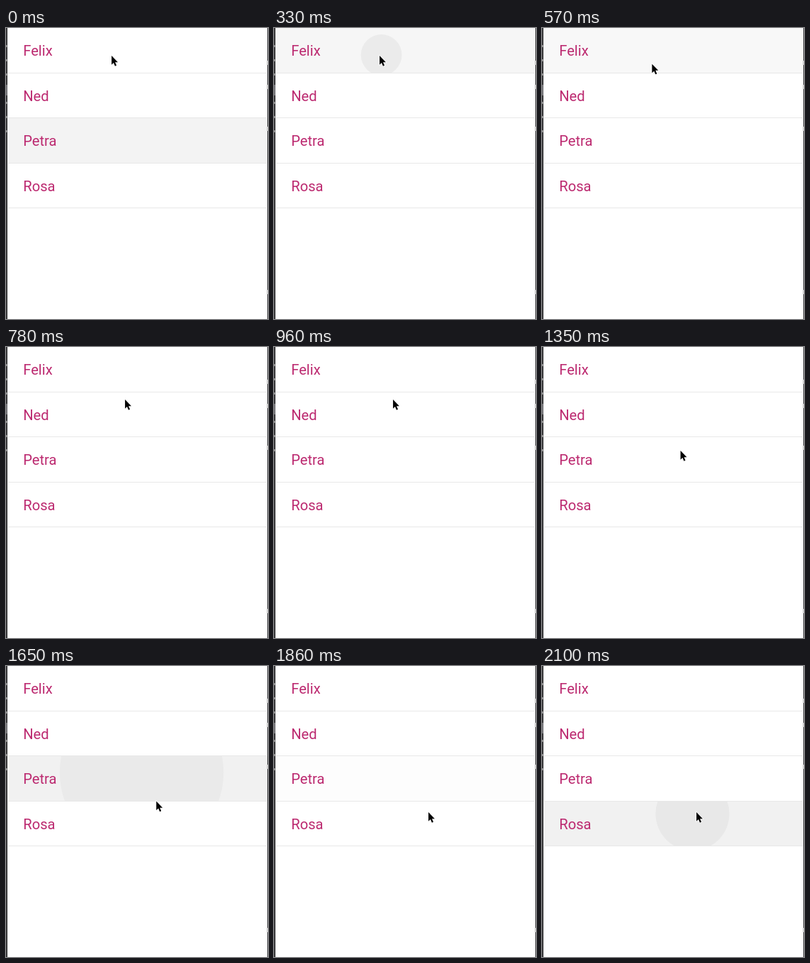
An HTML page that plays this animation: 370x410 px, repeating every 2220 ms.

```html
<!DOCTYPE html>
<html lang="en">
<head>
<meta charset="utf-8">
<title>Ripple list</title>
<style>
  html, body { margin: 0; width: 100%; height: 100%; overflow: hidden; background: #fff; }
  svg { display: block; }
  text { font: 20.2px Roboto, "Liberation Sans", sans-serif; fill: #bc2a70; }
</style>
</head>
<body>
<svg width="370" height="410" viewBox="0 0 370 410">
  <rect width="370" height="410" fill="#fff"/>
  <g id="list"></g>
  <g id="edges"></g>
  <g id="cursor">
    <path id="arrow" d="M0 0V14.6L3.3 11.5L5.6 16.8L8 15.8L5.7 10.6H10.2Z" transform="translate(.6 .6) scale(.87)" stroke="#fff" stroke-width="1.6" paint-order="stroke"/>
  </g>
</svg>
<script>
const LOOP = 2220, STEP = 30, HOLD = 2100, MOVE = 240;
const ROW = 63.5, WIDTH = 370;
const NAMES = ["Felix", "Ned", "Petra", "Rosa"];

// where the pointer rests in each row, and when it sets off to get there
const STOPS = [
  { x: 148.5, y: 38.5, go: -MOVE },
  { x: 167.5, y: 73.5, go: 540 },
  { x: 195, y: 145.5, go: 1042 },
  { x: 217.5, y: 205.5, go: 1563 }
];

// the first press is still fading out as the loop begins
const TAPS = [
  { row: 2, at: -240 },
  { row: 0, at: 300 },
  { row: 1, at: 990 },
  { row: 2, at: 1530 },
  { row: 3, at: 2046 }
];

const clamp = v => Math.max(0, Math.min(1, v));
const mix = (a, b, p) => a + (b - a) * p;
const easeOut = p => 1 - (1 - p) ** 3;
const byId = id => document.getElementById(id);

function setAttrs(el, attrs) {
  for (const key in attrs) el.setAttribute(key, attrs[key]);
}

function add(parent, tag, attrs) {
  const el = parent.appendChild(document.createElementNS("http://www.w3.org/2000/svg", tag));
  setAttrs(el, attrs);
  return el;
}

const list = byId("list"), edges = byId("edges"), cursor = byId("cursor");
const rowBox = i => ({ x: 2, y: i * ROW, width: WIDTH - 3, height: ROW });

NAMES.forEach((name, i) => {
  add(add(list, "clipPath", { id: "row" + i }), "rect", rowBox(i));
});
for (const tap of TAPS) {
  tap.tint = add(list, "rect", rowBox(tap.row));
  tap.ink = add(list, "circle", { "clip-path": `url(#row${tap.row})` });
}
NAMES.forEach((name, i) => {
  add(list, "text", { x: 24.2, y: 39.2 + i * ROW }).textContent = name;
  add(list, "rect", { x: 3, y: Math.floor((i + 1) * ROW - .4), width: WIDTH - 5, height: 1, fill: "#e8e8e8" });
});

// slivers of the window behind, at both sides
const strip = (x, y, width, height, fill) => add(edges, "rect", { x, y, width, height, fill });
strip(0, 0, 2, 410, "#3b3b3d");
strip(2, 0, 1, 410, "#f0f0f0");
strip(369, 0, 1, 410, "#48484a");
for (let y = 24; y < 150; y += 20) strip(0, y, 1.5, 3, "#a8a8a8");
strip(0, 80, 2, 15, "#77777a");
for (const y of [46, 80, 139, 369]) strip(368, y, 2, 6, "#d8d8d8");

function drawTap({ row, at, tint, ink }, t) {
  const age = Math.max(0, t - at);
  const drift = clamp(age / 350);
  tint.setAttribute("opacity", .055 * clamp(age / 45) * clamp((350 - age) / 150));
  setAttrs(ink, {
    cx: mix(STOPS[row].x, WIDTH / 2, drift),
    cy: mix(STOPS[row].y, (row + .5) * ROW, drift),
    r: age * .965,
    opacity: .05 * clamp(1 - age / 280)
  });
}

function drawCursor(t) {
  let { x, y } = STOPS[0];
  for (const stop of STOPS) {
    const p = easeOut(clamp((t - stop.go) / MOVE));
    x = mix(x, stop.x, p);
    y = mix(y, stop.y, p);
  }
  cursor.setAttribute("transform", `translate(${x} ${y})`);
}

const start = performance.now();
function tick() {
  const now = (performance.now() - start) % LOOP;
  const t = Math.min(HOLD, Math.floor(now / STEP) * STEP);
  TAPS.forEach(tap => drawTap(tap, t));
  drawCursor(t);
  requestAnimationFrame(tick);
}
tick();
</script>
</body>
</html>
```
